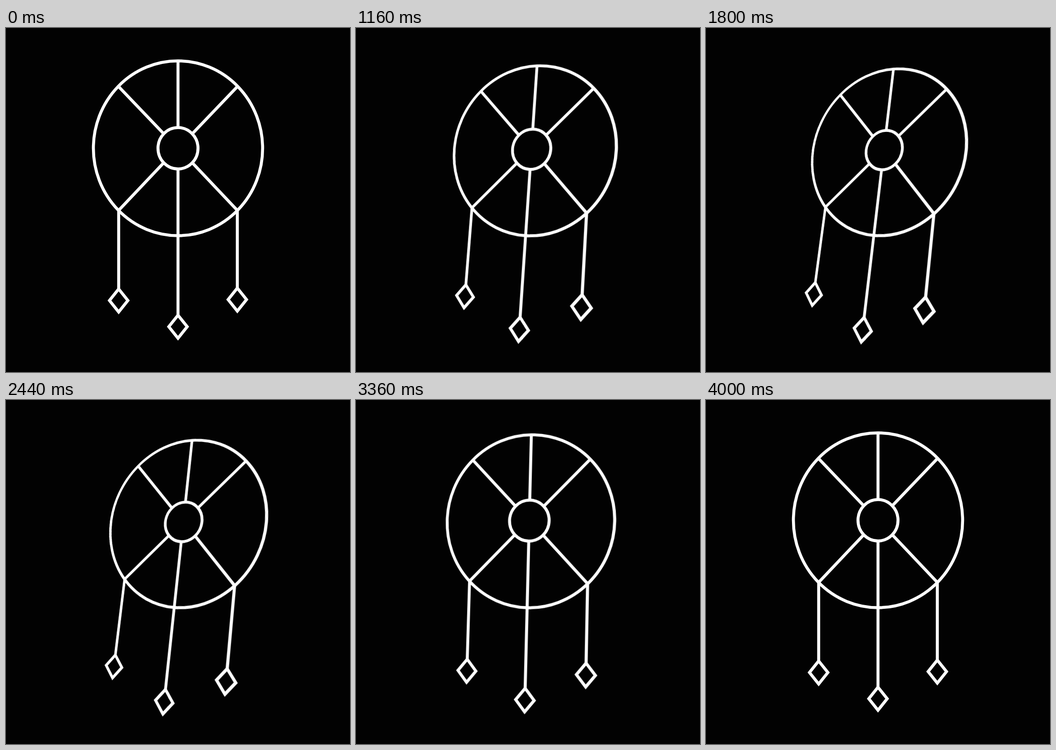
Animation, 748 px wide and 748 px high, one loop 4.04 s. Source, as an HTML page:

```html
<!DOCTYPE html>
<html lang="en">
<head>
<meta charset="utf-8">
<title>Dreamcatcher</title>
<style>
  html, body { margin: 0; width: 100%; height: 100%; overflow: hidden; background: #020202; }
  #stage { width: 748px; height: 748px; perspective: 1000px; overflow: hidden; }
  svg { display: block; fill: none; stroke: #fff; stroke-width: 6.5; }
</style>
</head>
<body>
<div id="stage">
  <svg id="catcher" width="748" height="748" viewBox="0 0 748 748">
    <defs>
      <path id="gem" d="M0-25L20 0 0 25-20 0Z"/>
    </defs>
    <ellipse cx="374" cy="261.5" rx="184" ry="190"/>
    <ellipse cx="374" cy="261.5" rx="43.5" ry="45"/>
    <path d="M374 72V217M374 306V625
             M244 126.5L343 230M504 126.5L405 230
             M343 293L245 396.5V568M405 293L503 396.5V566"/>
    <use href="#gem" x="245" y="592.5"/>
    <use href="#gem" x="374" y="649.5"/>
    <use href="#gem" x="503" y="590.5"/>
  </svg>
</div>
<script>
  const LOOP = 4040, MAX_TILT = 27.2;
  const catcher = document.getElementById('catcher');

  // Sine-eased swing out and back around a slanted axis
  function draw() {
    const phase = performance.now() % LOOP / LOOP;
    const tilt = MAX_TILT * (1 - Math.cos(2 * Math.PI * phase)) / 2;
    catcher.style.transform = `rotate3d(2, -5, 1, ${tilt}deg)`;
    requestAnimationFrame(draw);
  }
  draw();
</script>
</body>
</html>
```
